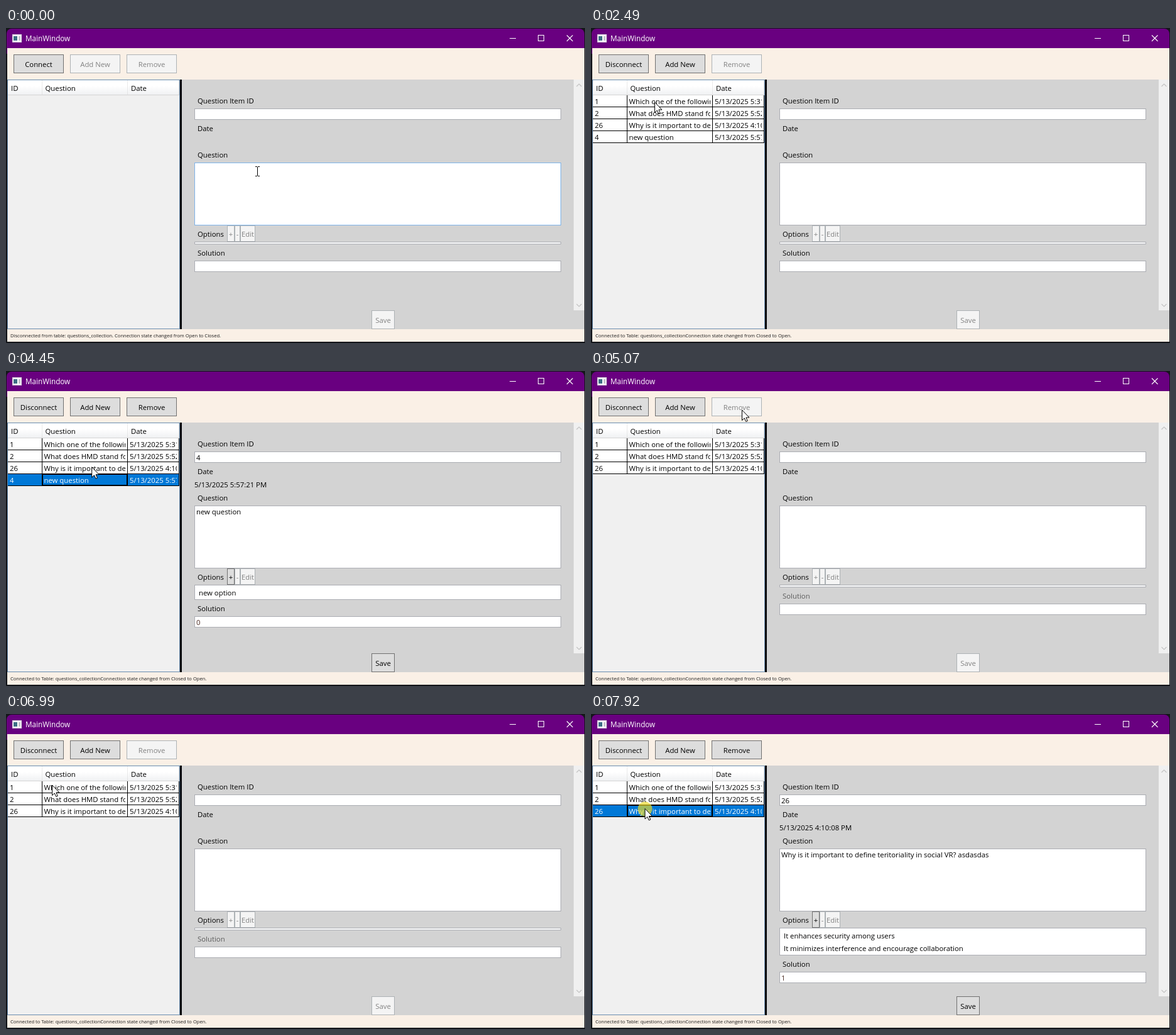
An HTML page with a canvas that plays this animation: 922x501 px, repeating every 8 s.

```html
<!DOCTYPE html>
<html lang="en">
<head>
<meta charset="utf-8">
<title>MainWindow</title>
<style>
html, body { margin: 0; width: 100%; height: 100%; overflow: hidden; background: #14161a; }
canvas { display: block; }
</style>
</head>
<body>
<canvas id="stage" width="922" height="501"></canvas>
<script>
const ctx = document.getElementById('stage').getContext('2d');
const LOOP = 8000;
const UI = 11.35;
const BLUE = '#0078d7';

const items = [
  { id: '1', date: '5/13/2025 5:31:12 PM', answer: '2',
    question: 'Which one of the following is a display used in virtual reality?',
    options: ['A desktop monitor', 'A television screen', 'A head mounted display', 'A paper map'] },
  { id: '2', date: '5/13/2025 5:52:40 PM', answer: '0',
    question: 'What does HMD stand for?',
    options: ['Head Mounted Display', 'High Motion Device', 'Hand Motion Detector'] },
  { id: '26', date: '5/13/2025 4:10:08 PM', answer: '1',
    question: 'Why is it important to define teritoriality in social VR? asdasdas',
    options: ['It enhances security among users', 'It minimizes interference and encourage collaboration'] },
  { id: '4', date: '5/13/2025 5:57:21 PM', answer: '0',
    question: 'new question', options: ['new option'] }
];

// start, end, number of steps, target x, target y
const moves = [
  [70, 200, 3, 394, 225],
  [400, 1000, 10, 74.5, 62],
  [1930, 2490, 9, 101.5, 118],
  [3020, 3230, 4, 108, 154],
  [3520, 3730, 4, 113.5, 173],
  [4250, 4930, 11, 240.5, 62],
  [5530, 6180, 10, 84, 65],
  [6710, 6990, 5, 73.5, 113],
  [7330, 7400, 2, 79, 133],
  [7730, 7790, 2, 86, 150.5]
];
const clicks = [
  [1200, 1265], [2750, 2820], [3380, 3450], [3860, 3930],
  [5000, 5070], [7120, 7190], [7400, 7580], [7860, 8000]
];
// time, index of the selected item
const picks = [[0, -1], [2820, 0], [3450, 2], [3990, 3], [5070, -1], [7190, 0], [7580, 1], [7920, 2]];

function pointer(t) {
  let x = 400, y = 228;
  for (const [from, to, n, tx, ty] of moves) {
    if (t < from) break;
    const step = Math.floor((t - from) / ((to - from) / (n - 1)) + 0.01) + 1;
    const p = Math.min(1, step / n);
    const e = p * p * (3 - 2 * p);
    x += (tx - x) * e;
    y += (ty - y) * e;
  }
  return { x, y };
}

function stateAt(t) {
  const cursor = pointer(t);
  return {
    ...cursor,
    down: clicks.some(([a, b]) => t >= a && t < b),
    sel: picks.filter(p => p[0] <= t).pop()[1],
    online: t >= 1330,
    removed: t >= 5070
  };
}

function fill(x, y, w, h, color) {
  ctx.fillStyle = color;
  ctx.fillRect(x, y, w, h);
}

function box(x, y, w, h, back, border) {
  fill(x, y, w, h, border);
  fill(x + 1, y + 1, w - 2, h - 2, back);
}

function text(str, x, midY, color = '#000', size = UI, align = 'left') {
  ctx.font = `${size}px "Open Sans", "Noto Sans", sans-serif`;
  ctx.textAlign = align;
  ctx.fillStyle = color;
  ctx.fillText(str, x, midY + 4);
}

function line(color, width, ...pts) {
  ctx.strokeStyle = color;
  ctx.lineWidth = width;
  ctx.beginPath();
  for (let i = 0; i < pts.length; i += 2) ctx.lineTo(pts[i], pts[i + 1]);
  ctx.stroke();
}

function clipped(x, y, w, h, draw) {
  ctx.save();
  ctx.beginPath();
  ctx.rect(x, y, w, h);
  ctx.clip();
  draw();
  ctx.restore();
}

const over = (s, x, y, w, h) => s.x >= x && s.x < x + w && s.y >= y && s.y < y + h;

function button(s, label, x, y, w, h, enabled) {
  const hot = enabled && over(s, x, y, w, h);
  let back = '#dddddd', border = '#707070';
  if (!enabled) { back = '#f4f4f4'; border = '#adb2b5'; }
  else if (hot && s.down) { back = '#c4e5f6'; border = '#2c628b'; }
  else if (hot) { back = '#bee6fd'; border = '#3c7fb1'; }
  box(x, y, w, h, back, border);
  text(label, x + w / 2, y + h / 2 + 1, enabled ? '#000' : '#838383', UI, 'center');
}

function field(s, x, y, w, h, value, color) {
  box(x, y, w, h, '#fff', over(s, x, y, w, h) ? '#7eb4ea' : '#abadb3');
  if (value) text(value, x + 3, y + 10, color);
}

function frame() {
  fill(0, 0, 922, 501, '#14161a');
  ctx.fillStyle = '#690080';
  ctx.beginPath();
  ctx.roundRect(1, 1, 920, 40, [8, 8, 0, 0]);
  ctx.fill();
  fill(2, 32, 919, 467, '#faf0e6');
  // window icon
  box(10, 10, 15, 13, '#fff', '#d8d8de');
  fill(12, 13, 6, 7, '#3d6f86');
  fill(20, 13, 3, 7, '#c4c4cc');
  text('MainWindow', 31, 17, '#fff', 11.7);
  line('#fff', 1, 802, 16.5, 812, 16.5);
  ctx.strokeRect(847.5, 11.5, 9, 9);
  line('#fff', 1.1, 893, 11.5, 902.5, 21);
  line('#fff', 1.1, 902.5, 11.5, 893, 21);
}

function header(s, label, x, w) {
  const hot = over(s, x, 83, w, 24);
  const g = ctx.createLinearGradient(0, 83, 0, 106);
  g.addColorStop(0, hot ? '#e9f7fe' : '#ffffff');
  g.addColorStop(0.4, hot ? '#e0f4fd' : '#ffffff');
  g.addColorStop(1, hot ? '#c3e7f9' : '#f0f1f3');
  fill(x, 83, w, 23, g);
  fill(x + w - 1, 83, 1, 23, hot ? '#88cbeb' : '#d5d5d5');
  fill(x, 106, w, 1, hot ? '#88cbeb' : '#d5d5d5');
  text(label, x + 5, 96);
}

function row(item, y, selected) {
  const ink = selected ? '#fff' : '#000';
  fill(3, y, 273, 18, selected ? BLUE : '#fff');
  fill(3, y + 18, 273, 1, '#000');
  for (const x of [57, 193, 275]) fill(x, y, 1, 19, '#000');
  if (selected) {
    ctx.strokeStyle = '#000';
    ctx.lineWidth = 1;
    ctx.strokeRect(58.5, y + 0.5, 134, 17);
  }
  text(item.id, 6, y + 10, ink);
  clipped(58, y, 132, 18, () => text(item.question, 60.5, y + 10, ink));
  clipped(194, y, 78, 18, () => text(item.date, 197, y + 10, ink));
}

function grid(s) {
  box(2, 82, 275, 397, '#f0f0f0', '#688caf');
  header(s, 'ID', 3, 55);
  header(s, 'Question', 57.5, 137);
  header(s, 'Date', 194, 82);
  if (s.online) {
    const count = s.removed ? 3 : 4;
    for (let i = 0; i < count; i++) row(items[i], 107 + 19 * i, i === s.sel);
  }
  fill(277, 82, 3, 397, '#05070c');
}

function scrollBar(content) {
  const view = 367, active = content > view;
  const ink = active ? '#606060' : '#c4c4c4';
  fill(904, 82, 17, view, '#f0f0f0');
  if (active) fill(905, 99, 15, 333 * view / content, '#cdcdcd');
  line(ink, 1.2, 908.5, 93, 912.5, 89, 916.5, 93);
  line(ink, 1.2, 908.5, 439, 912.5, 443, 916.5, 439);
}

function form(s) {
  const item = items[s.sel];
  const options = item ? item.options : [];
  const shift = options.length * 20;
  fill(280, 82, 641, 397, '#d3d3d3');
  clipped(280, 82, 624, 367, () => {
    text('Question Item ID', 305, 116);
    field(s, 300, 128, 584, 18, item && item.id);
    text('Date', 305, 160);
    if (item) text(item.date, 300, 181);
    text('Question', 305, 202);
    field(s, 300, 214, 584, 100, item && item.question);
    text('Options', 305, 328);
    button(s, '+', 352, 314, 12, 26, !!item);
    button(s, '-', 364, 314, 9, 26, false);
    button(s, 'Edit', 373, 314, 24, 26, false);
    box(300, 340, 584, 4 + shift, '#fff', '#abadb3');
    options.forEach((o, i) => text(o, 307, 353 + 20 * i));
    text('Solution', 305, 358 + shift, s.removed && !item ? '#5c5c5c' : '#000');
    field(s, 300, 370 + shift, 584, 18, item && item.answer, '#4a2a20');
  });
  scrollBar(326 + shift);
  button(s, 'Save', 582, 449, 37, 30, !!item);
}

function cursor(s) {
  const { x, y } = s;
  if (s.down) {
    ctx.fillStyle = 'rgba(236, 218, 40, 0.68)';
    ctx.beginPath();
    ctx.arc(x, y + 0.5, 11.5, 0, Math.PI * 2);
    ctx.fill();
  }
  if (over(s, 300, 214, 584, 100)) {
    const cx = Math.round(x), top = Math.round(y) - 8;
    fill(cx, top + 1, 1, 14, '#000');
    for (const dy of [0, 15]) {
      fill(cx - 3, top + dy, 3, 1, '#000');
      fill(cx + 1, top + dy, 3, 1, '#000');
    }
    return;
  }
  ctx.save();
  ctx.translate(x, y);
  ctx.beginPath();
  const arrow = [0, 0, 0, 16.5, 3.8, 13, 6.3, 18.5, 8.8, 17.4, 6.4, 12, 11.5, 12];
  for (let i = 0; i < arrow.length; i += 2) ctx.lineTo(arrow[i], arrow[i + 1]);
  ctx.closePath();
  ctx.fillStyle = '#fff';
  ctx.strokeStyle = '#000';
  ctx.lineWidth = 1;
  ctx.fill();
  ctx.stroke();
  ctx.restore();
}

function draw(t) {
  const s = stateAt(t);
  frame();
  button(s, s.online ? 'Disconnect' : 'Connect', 12, 42, 80, 30, true);
  button(s, 'Add New', 102, 42, 80, 30, s.online);
  button(s, 'Remove', 192, 42, 80, 30, s.sel >= 0);
  grid(s);
  form(s);
  const status = s.online
    ? 'Connected to Table: questions_collectionConnection state changed from Closed to Open.'
    : 'Disconnected from table: questions_collection. Connection state changed from Open to Closed.';
  text(status, 7, 488, '#1a1a1a', 7.57);
  cursor(s);
}

const begin = performance.now();
function tick() {
  draw((performance.now() - begin) % LOOP);
  requestAnimationFrame(tick);
}
tick();
</script>
</body>
</html>
```
